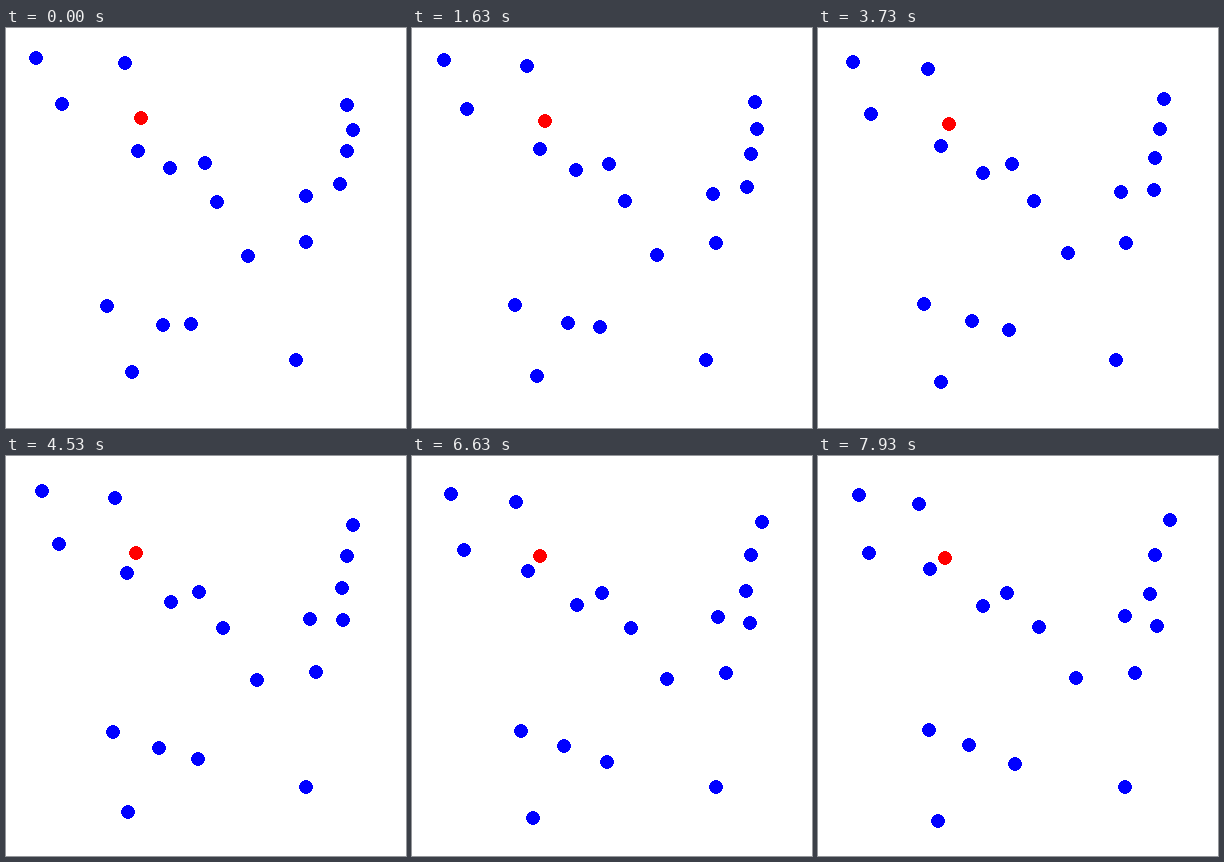
A matplotlib script for the animation above (8000 ms loop, 400x400 px).

```python
import numpy as np
import matplotlib.pyplot as plt
from matplotlib.animation import FuncAnimation
from matplotlib.patches import Polygon

SIZE = 400
LOOP_MS = 8000
TICK_MS = 20      # display interval
STEP_MS = 100     # the dots move once per step
STEPS = LOOP_MS // STEP_MS
LEAD_MS = 80      # the first move comes early in the loop

# Pixels travelled per loop: dots as (start x, start y, heading in degrees).
PACES = {
    14.4: [(135, 90, 124), (30, 30, 39), (334, 156, 70)],
    10.5: [(164, 140, 84), (199, 135, 167), (211, 174, -16), (300, 168, -50),
           (347, 102, 197), (101, 278, -20), (157, 297, 234)],
    17.3: [(242, 228, -22), (300, 214, 10), (341, 77, -50), (341, 123, 121),
           (185, 296, 45), (290, 332, -3)],
    22.0: [(119, 35, 145), (56, 76, 104), (132, 123, 207), (126, 344, 107)],
}


def polar(radius, degrees):
    angle = np.radians(degrees)
    return np.column_stack([radius * np.cos(angle), radius * np.sin(angle)])


dots = np.array([(*dot, pace) for pace, group in PACES.items() for dot in group])
start = dots[:, :2] + 0.5
drift = polar(dots[:, 3], dots[:, 2])

# An octagon with slightly longer points on the axes.
corner = np.arange(8)
outline = polar(np.where(corner % 2, 6.3, 7.0), 45 * corner)

fig = plt.figure(figsize=(SIZE / 100, SIZE / 100), dpi=100, facecolor="white")
ax = fig.add_axes([0, 0, 1, 1])
ax.set(xlim=(0, SIZE), ylim=(SIZE, 0))
ax.axis("off")

shapes = [
    ax.add_patch(Polygon(outline, facecolor="blue" if i else "red",
                         edgecolor="none", linewidth=0, antialiased=False))
    for i in range(len(dots))
]


def update(frame):
    step = (frame * TICK_MS + LEAD_MS) // STEP_MS
    # Dots sit on whole pixels.
    centers = np.floor(start + drift * step / STEPS)
    for shape, center in zip(shapes, centers):
        shape.set_xy(outline + center)
    return shapes


anim = FuncAnimation(fig, update, frames=LOOP_MS // TICK_MS,
                     interval=TICK_MS, repeat=True, repeat_delay=0)
plt.show()
```
